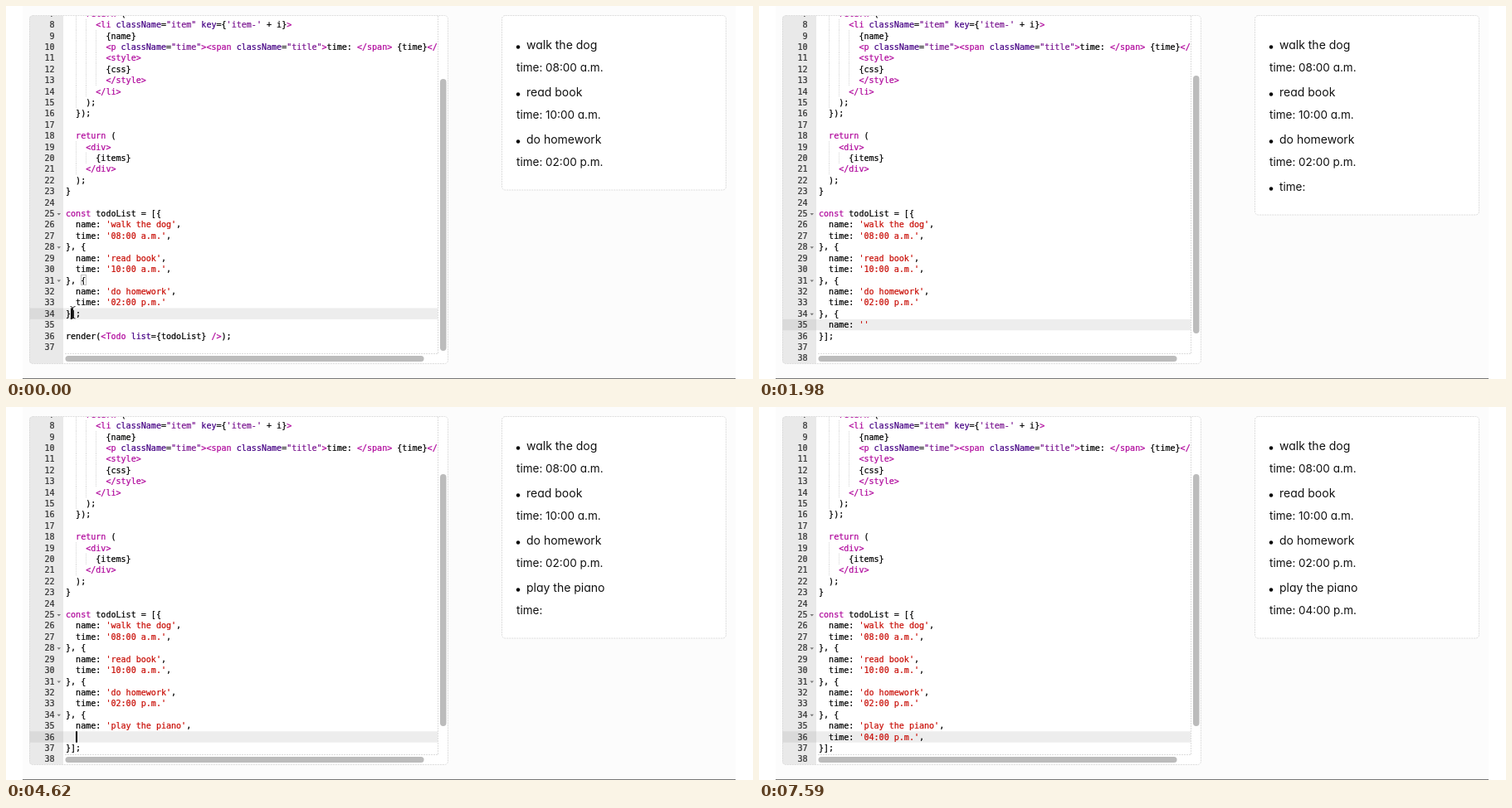
These frames come from a looping animation (900 px wide and 450 px high, 7.92 s). An HTML page:

```html
<!DOCTYPE html>
<html lang="en">
<head>
<meta charset="utf-8">
<title>Live todo editor</title>
<style>
  html, body { margin: 0; width: 100%; height: 100%; overflow: hidden; background: #fff; }
  svg { display: block; width: 900px; height: 450px; }
  text { white-space: pre; }
  .code { font: 10.05px "DejaVu Sans Mono", monospace; fill: #000; stroke: #000; stroke-width: .22px; }
  .num { fill: #333; stroke: #333; text-anchor: end; }
  .key { fill: #b0089c; stroke: #b0089c; }
  .attr { fill: #450084; stroke: #450084; }
  .value { fill: #7a1590; stroke: #7a1590; }
  .str { fill: #c90f08; stroke: #c90f08; }
  .guide { stroke: #d5d5d5; stroke-dasharray: 1 1; }
  .edge { fill: none; stroke: #dcdcdc; stroke-dasharray: 2 1; }
  .thumb { fill: #bcbcbc; }
  .name, .time { font: 14px Inter, sans-serif; font-feature-settings: "cv11"; fill: #111; }
  .time { font-size: 13.5px; }
</style>
</head>
<body>
<svg viewBox="0 0 900 450">
  <defs>
    <clipPath id="gutterClip"><rect x="28" y="12" width="41" height="419"/></clipPath>
    <clipPath id="codeClip"><rect x="69" y="12" width="451" height="407"/></clipPath>
  </defs>
  <rect x="20" width="859" height="449" fill="#fcfcfc"/>
  <rect x="20" y="449" width="859" height="1" fill="#777"/>
  <rect x="28" y="11" width="505" height="421" rx="4" fill="#fff"/>
  <path d="M32 11.5H69V431.5H32a4 4 0 0 1-4-4V15.500a4 4 0 0 1 4-4z" fill="#e9e9e9"/>
  <g id="gutter" clip-path="url(#gutterClip)"></g>
  <g id="code" clip-path="url(#codeClip)"></g>
  <path class="edge" d="M520.500 12V419.500H70"/>
  <rect class="edge" x="28.500" y="11.500" width="504" height="420" rx="4"/>
  <rect class="thumb" x="71.500" y="422" width="432" height="7" rx="3.500"/>
  <rect class="thumb" id="scroll" x="523" width="7.500" rx="3.700"/>
  <rect class="edge" id="card" x="597.500" y="11.500" width="270" rx="4" style="fill:#fff"/>
  <g id="list"></g>
</svg>
<script>
const LOOP = 7920, STEP = 330;
const LEFT = 72, CHAR = 6.05, ROW = 13.41, FIRST = 7;

const head = `    return (
      <li className="item" key={'item-' + i}>
        {name}
        <p className="time"><span className="title">time: </span> {time}</p>
        <style>
        {css}
        </style>
      </li>
    );
  });

  return (
    <div>
      {items}
    </div>
  );
}

const todoList = [{
  name: 'walk the dog',
  time: '08:00 a.m.',
}, {
  name: 'read book',
  time: '10:00 a.m.',
}, {
  name: 'do homework',
  time: '02:00 p.m.'`.split('\n');
const tail = ['', 'render(<Todo list={todoList} />);', ''];
const items = [['walk the dog', '08:00 a.m.'], ['read book', '10:00 a.m.'], ['do homework', '02:00 p.m.']];

const open = ['}, {'], NAME = "  name: 'play the piano'";
const naming = text => [...open, '  name: ' + text];
const timing = text => [...open, NAME + ',', '  time: ' + text];

// [step, typed lines, cursor column or -1, preview name, preview time]
const steps = [
  [0, [], 1],
  [1, ['}, {'], 4],
  [2, [...open, '  '], 2],
  [3, naming(''), 8],
  [4, naming(''), 8, '', ''],
  [6, naming("''"), -1, '', ''],
  [9, naming("'pl'"), 11, '', ''],
  [10, naming("'play'"), 13, '', ''],
  [11, naming("'play the'"), 17, '', ''],
  [12, naming("'play the piano'"), 23, '', ''],
  [13, naming("'play the piano'"), 24, 'play the piano', ''],
  [14, [...open, NAME + ',', '  '], 2, 'play the piano', ''],
  [15, timing(''), 8, 'play the piano', ''],
  [16, timing("'',"), 11, 'play the piano', ''],
  [17, timing("'',"), 9, 'play the piano', ''],
  [18, timing("'0',"), 10, 'play the piano', ''],
  [19, timing("'04',"), 11, 'play the piano', ''],
  [20, timing("'04:00',"), 14, 'play the piano', '04'],
  [21, timing("'04:00 p',"), 16, 'play the piano', '04:00'],
  [22, timing("'04:00 p.m.',"), 19, 'play the piano', '04:00'],
  [23, timing("'04:00 p.m.',"), -1, 'play the piano', '04:00 p.m.']
];

const $ = id => document.getElementById(id);
const esc = s => s.replace(/&/g, '&amp;').replace(/</g, '&lt;');
const text = (cls, x, y, s) => `<text class="${cls}" x="${x}" y="${y}">${esc(s)}</text>`;
const rect = (x, y, w, h, attrs) => `<rect x="${x}" y="${y}" width="${w}" height="${h}" ${attrs}/>`;
const colX = col => LEFT + col * CHAR;
const rowY = line => 22.5 + (line - 8) * ROW;
const marker = (line, col) =>
  rect(Math.round(colX(col)) + .5, Math.round(rowY(line) - 6.5) + .5, 6, 12, 'fill="none" stroke="#bfbfbf"');

function codeLine(line, src) {
  const y = rowY(line) + 3.6, indent = src.search(/\S|$/);
  const quoted = src.includes('<') ? 'value' : 'str';
  let out = '', at = 0;
  const put = (cls, s, col) => { if (s.trim()) out += text('code ' + cls, colX(col), y, s); };
  for (let col = 2; col < indent; col += 2) {
    const x = Math.round(colX(col)) + .5;
    out += `<path class="guide" d="M${x} ${rowY(line) - 6.7}v${ROW}"/>`;
  }
  const rule = /('[^']*'?|"[^"]*")|(\b(?:const|return)\b|<\/?\w*|\/?>)|(\b\w+(?==))/g;
  for (const m of src.matchAll(rule)) {
    put('', src.slice(at, m.index), at);
    put(m[1] ? quoted : m[2] ? 'key' : 'attr', m[0], m.index);
    at = m.index + m[0].length;
  }
  put('', src.slice(at), at);
  return out;
}

function drawEditor(step, typed, col) {
  const inline = typed.length === 1;
  const end = inline ? [typed[0] + '}];'] : [...typed, '}];'];
  const lines = [...head, ...end, ...tail];
  const active = 34 + Math.max(0, typed.length - 1);
  const top = rowY(active) - ROW / 2;
  let gutter = rect(28, top, 41, ROW, 'fill="#dadada"');
  let code = rect(69, top, 451, ROW, 'fill="#ededed"');
  lines.forEach((src, i) => {
    const line = FIRST + i, y = rowY(line);
    gutter += text('code num', 58.5, y + 3.6, String(line));
    if (line >= 25 && /\{$/.test(src)) gutter += `<path d="M61.500 ${y - .5}h4.500l-2.250 2.500z" fill="#777"/>`;
    code += codeLine(line, src);
  });
  if (step === 0) code += marker(31, 3);
  if (inline) code += marker(34, 4);
  if (col >= 0) code += rect(Math.round(colX(col)), top, 2, ROW, '');
  if (step === 0) code += '<path d="M77.500 362.500q2.500 0 3 2q.5-2 3-2M80.500 364v11M77.500 377q2.500 0 3-2q.5 2 3 2" fill="none" stroke="#222"/>';
  $('gutter').innerHTML = gutter;
  $('code').innerHTML = code;

  const [from, to] = [[88, 416], [84, 395], [81, 385]][active - 34];
  $('scroll').setAttribute('y', from);
  $('scroll').setAttribute('height', to - from);
}

function drawPreview(name, time) {
  const all = name === undefined ? items : [...items, [name, time]];
  $('list').innerHTML = all.map(([label, when], i) => {
    const y = 52 + i * 57, clock = 'time: ' + when;
    return `<circle cx="617" cy="${y - 2.5}" r="2.200"/>` +
      (label ? text('name', 627, y, label) + text('time', 615, y + 27, clock) : text('time', 627, y, clock));
  }).join('');
  const bottom = name === undefined ? 222 : name ? 279 : 252;
  $('card').setAttribute('height', bottom - 11.5);
}

let shown;
function frame() {
  const now = Math.floor(performance.now() % LOOP / STEP);
  const state = steps.findLast(s => s[0] <= now);
  if (state !== shown) {
    const [step, typed, col, name, time] = shown = state;
    drawEditor(step, typed, col);
    drawPreview(name, time);
  }
  requestAnimationFrame(frame);
}
frame();
</script>
</body>
</html>
```
